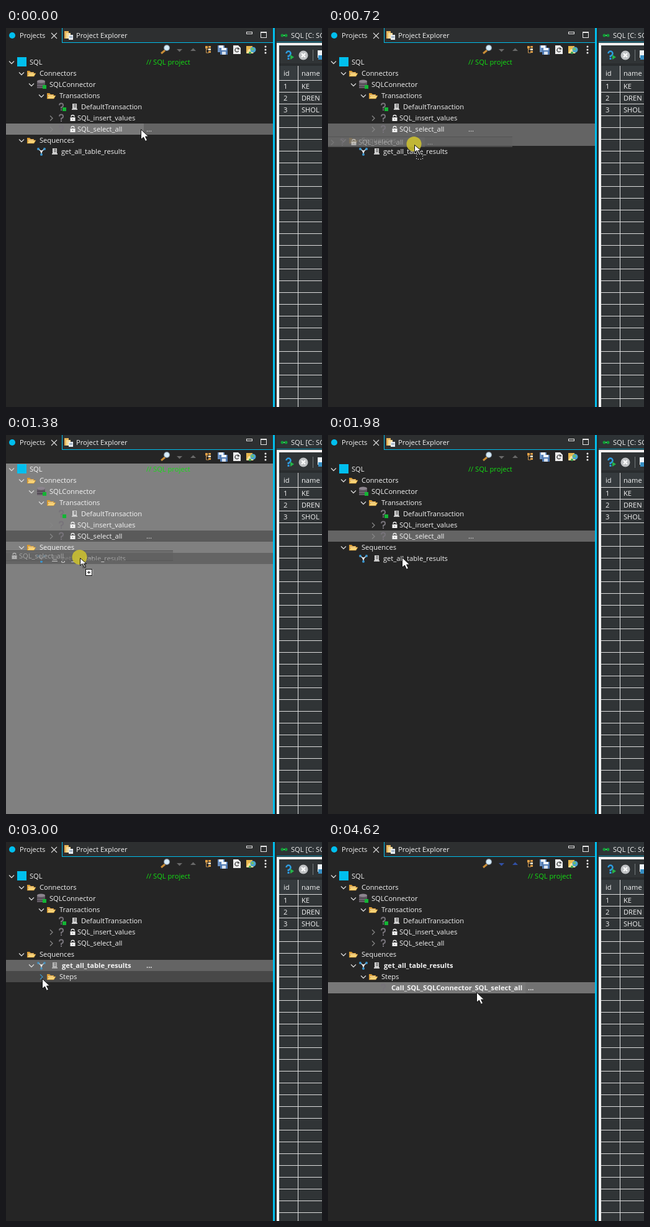
An HTML page with a canvas that plays this animation: 509x611 px, repeating every 6180 ms.

```html
<!DOCTYPE html>
<html lang="en">
<head>
<meta charset="utf-8">
<title>Project tree drag and drop</title>
<style>
html, body { margin: 0; width: 100%; height: 100%; overflow: hidden; background: #252525; }
canvas { display: block; }
</style>
</head>
<body>
<canvas id="stage" width="509" height="611"></canvas>
<script>
const ctx = document.getElementById('stage').getContext('2d');
const LOOP = 6180, STEP = 60;
const FONT = '11.15px "Open Sans", "Noto Sans", sans-serif';
const CYAN = '#00bfee', WHITE = '#f4f4f4', DARK = '#252525';
const SELECTED = '#646464', ACTIVE = '#787878', HOVER = '#484848';

// time, x, y of the pointer tip
const pointer = [
  [0, 217, 163], [60, 217, 163], [240, 206, 167], [360, 199, 169], [540, 167, 181],
  [720, 139, 188], [960, 129, 193], [1320, 119, 198], [2220, 119, 197],
  [2460, 98, 203], [2760, 42, 201], [2880, 38, 199], [2940, 46, 210],
  [3000, 58, 220], [3360, 60, 221], [3600, 110, 232], [3840, 170, 242],
  [4140, 239, 242], [LOOP, 239, 242]
];
// offset of the dragged row
const dragged = [[360, -5, 2], [540, -37, 12], [720, -66, 21], [1320, -94, 32], [1920, -94, 32]];

function along(path, t) {
  let i = 1;
  while (i < path.length - 1 && path[i][0] < t) i++;
  const a = path[i - 1], b = path[i];
  const k = Math.max(0, Math.min(1, (t - a[0]) / (b[0] - a[0])));
  return [Math.round(a[1] + (b[1] - a[1]) * k), Math.round(a[2] + (b[2] - a[2]) * k)];
}

function rect(x, y, w, h, color) {
  ctx.fillStyle = color;
  ctx.fillRect(x, y, w, h);
}

function poly(points, fill, stroke, width = 1, closed = true) {
  ctx.beginPath();
  points.forEach(([x, y]) => ctx.lineTo(x, y));
  if (closed) ctx.closePath();
  if (fill) { ctx.fillStyle = fill; ctx.fill(); }
  if (stroke) { ctx.strokeStyle = stroke; ctx.lineWidth = width; ctx.stroke(); }
}

function disc(x, y, r, fill) {
  ctx.beginPath();
  ctx.arc(x, y, r, 0, Math.PI * 2);
  ctx.fillStyle = fill;
  ctx.fill();
}

function ring(x, y, r, color, width, from = 0, to = Math.PI * 2) {
  ctx.beginPath();
  ctx.arc(x, y, r, from, to);
  ctx.strokeStyle = color;
  ctx.lineWidth = width;
  ctx.stroke();
}

function label(s, x, y, color = WHITE, bold = false) {
  ctx.font = (bold ? 'bold ' : '') + FONT;
  ctx.fillStyle = color;
  ctx.fillText(s, x, y);
}

function chevron(x, y, open, color) {
  const p = open ? [[-4, -2], [0, 2], [4, -2]] : [[-2, -4], [2, 0], [-2, 4]];
  poly(p.map(([a, b]) => [x + a, y + b]), null, color || (open ? '#d6d6d6' : '#858585'), 1.3, false);
}

const icons = {
  project(x, y) {
    rect(x - 7, y - 8, 15, 15, CYAN);
  },
  folder(x, y) {
    poly([[x - 6, y + 5], [x - 6, y - 4], [x - 2, y - 4], [x, y - 2], [x + 5, y - 2], [x + 5, y + 5]], '#d99c35');
    rect(x - 4, y - 1, 8, 3, '#fff6dc');
    poly([[x - 6, y + 5], [x - 3, y], [x + 8, y], [x + 5, y + 5]], '#fbd578', '#b98127', .6);
  },
  database(x, y) {
    rect(x - 7, y - 5, 13, 11, '#68606a');
    ctx.beginPath();
    ctx.ellipse(x - .5, y - 5, 6.5, 2.5, 0, 0, Math.PI * 2);
    ctx.fillStyle = '#8d858f';
    ctx.fill();
    rect(x - 7, y - 1, 13, 1, '#453f47');
    rect(x - 7, y + 3, 13, 1, '#453f47');
    rect(x + 2, y + 1, 6, 6, '#13b534');
  },
  query(x, y) {
    ring(x - 1, y - 2.5, 3, '#77737a', 2, Math.PI, Math.PI * 2.45);
    rect(x - 2, y, 2, 3, '#77737a');
    rect(x - 2, y + 4, 2, 2, '#77737a');
  },
  defaultQuery(x, y) {
    icons.query(x, y);
    rect(x + 1, y + 1, 6, 6, '#13b534');
  },
  doc(x, y) {
    rect(x - 3, y - 5, 7, 8, '#d8d8d8');
    for (let i = 0; i < 3; i++) rect(x - 1, y - 4 + i * 2, 4, 1, '#555');
    rect(x - 4, y + 3, 9, 2, '#c4c4c4');
  },
  lock(x, y) {
    ring(x + .5, y - 2, 2.5, '#eee', 1.3, Math.PI, 0);
    rect(x - 3.5, y - 1, 8, 6, '#f2f2f2');
    rect(x, y + 1, 1, 2, '#777');
  },
  sequence(x, y) {
    poly([[x - 5, y - 4], [x, y], [x + 5, y - 4]], null, '#dceaf4', 1.5, false);
    poly([[x, y], [x, y + 5]], null, '#dceaf4', 1.5, false);
    disc(x - 5, y - 4, 2, '#3c97cf');
    disc(x + 5, y - 4, 2, '#3c97cf');
    disc(x, y + 5, 2, '#3c97cf');
    disc(x, y, 1.7, '#fff');
  }
};

// row, chevron x, icons, text, text x
const nodes = [
  [0, 9, [['project', 25]], 'SQL', 38],
  [1, 25, [['folder', 40]], 'Connectors', 54],
  [2, 41, [['database', 57]], 'SQLConnector', 70],
  [3, 57, [['folder', 72]], 'Transactions', 86],
  [4, 0, [['defaultQuery', 90], ['doc', 110]], 'DefaultTransaction', 121],
  [5, 73, [['query', 90], ['lock', 107]], 'SQL_insert_values', 115],
  [6, 73, [['query', 90], ['lock', 107]], 'SQL_select_all', 115],
  [7, 25, [['folder', 40]], 'Sequences', 54],
  [8, 41, [['sequence', 57], ['doc', 78]], 'get_all_table_results', 89],
  [9, 57, [['folder', 72]], 'Steps', 86],
  [10, 0, [['query', 90]], 'Call_SQL_SQLConnector_SQL_select_all', 102]
];

function drawNode(node, t) {
  const [row, cx, marks, name, tx] = node;
  const y = 55 + row * 18;
  const bold = row === 10 || row === 8 && t >= 2040;
  let open = row !== 5 && row !== 6;
  if (row === 8) open = t >= 2940;
  if (row === 9) open = t >= 3300;
  if (cx && (row !== 8 || t >= 2040)) {
    chevron(cx, y + .5, open, row === 9 && !open ? '#3e91c0' : null);
  }
  ctx.globalAlpha = row === 8 && t >= 2040 && t < 4320 ? .75 : 1;
  marks.forEach(([kind, x]) => icons[kind](x, y));
  ctx.globalAlpha = 1;
  label(name, tx + (bold && row === 8 ? 1 : 0), y + 4, WHITE, bold);
}

function drawToolbar(t) {
  rect(0, 0, 433, 24, '#2d2f30');
  rect(0, 0, 90, 46, DARK);
  rect(0, 24, 430, 22, DARK);
  rect(90, 0, 1, 24, CYAN);
  rect(90, 23, 341, 1, CYAN);
  disc(10, 12, 5, CYAN);
  label('Projects', 22, 16);
  poly([[73, 8], [82, 17]], null, '#ddd', 1.1, false);
  poly([[82, 8], [73, 17]], null, '#ddd', 1.1, false);
  rect(94, 5, 7, 12, '#e8b65b');
  rect(97, 8, 7, 9, '#f3dca2');
  rect(101, 11, 7, 8, '#eef2f7');
  rect(102, 13, 5, 1, '#7990aa');
  rect(102, 15, 5, 1, '#7990aa');
  label('Project Explorer', 113, 16);
  ctx.strokeStyle = '#e7e7e7';
  ctx.lineWidth = 1;
  ctx.strokeRect(387.5, 6.5, 9, 3);
  ctx.strokeRect(410.5, 6.5, 9, 9);
  rect(410, 6, 10, 2, '#e7e7e7');

  poly([[250, 41], [256, 36]], null, '#c98d37', 3, false);
  disc(259, 32, 5, '#8b9cac');
  disc(259, 32, 3.8, '#d7edfa');
  const arrow = t >= 4320 ? '#3150a6' : '#686868';
  poly([[275, 34], [284, 34], [279.5, 38.5]], arrow);
  poly([[297, 37], [306, 37], [301.5, 32.5]], arrow);
  poly([[322.5, 29], [322.5, 40], [327, 40]], null, '#c89553', 1, false);
  rect(322, 34, 5, 1, '#c89553');
  rect(321, 29, 4, 4, '#dc9d45');
  for (let i = 0; i < 3; i++) rect(326, 29 + i * 4, 4, 3, i === 1 ? '#eee1c5' : '#d99c48');
  rect(341, 28, 11, 11, '#698fc1');
  rect(343, 28, 7, 4, '#edf4fb');
  rect(345, 32, 12, 11, '#4f79b2');
  rect(347, 32, 8, 4, '#eff5fb');
  rect(348, 38, 6, 5, '#d6e1ef');
  poly([[366, 28], [374, 28], [378, 32], [378, 42], [366, 42]], '#ededed');
  ring(372, 35.5, 3, '#555', 1.4, .5, 5.5);
  poly([[373, 31], [377, 34], [373, 35]], '#444');
  rect(387, 29, 10, 11, '#e7b84f');
  poly([[387, 41], [391, 34], [402, 34], [398, 41]], '#ffe39b');
  disc(398, 35, 4.5, '#4ba5ce');
  disc(397, 34, 2, '#70c35d');
  disc(393, 40, 2, '#39a650');
  [30, 35, 40].forEach(y => disc(418, y, 1.5, '#f4f4f4'));
}

function drawEditor() {
  rect(430, 0, 79, 611, '#292c2e');
  rect(430, 0, 3, 611, CYAN);
  rect(433, 0, 3, 611, '#292c2e');
  rect(436, 0, 73, 23, '#2e3336');
  rect(436, 22, 73, 1, '#0b8baa');
  rect(436, 24, 73, 587, '#f3f3f3');
  rect(440, 28, 69, 583, '#303436');
  disc(445, 12, 2.5, '#129a36');
  disc(451, 12, 2.5, '#129a36');
  rect(447, 11, 2, 2, '#52c573');
  label('SQL [C: SQL', 459, 16);

  ring(455, 41, 3.5, '#2d9ce0', 2.5, Math.PI, Math.PI * 2.45);
  rect(453.5, 44, 3, 3, '#2d9ce0');
  rect(453.5, 48, 3, 3, '#2d9ce0');
  poly([[458, 43], [464, 47], [458, 51]], '#25b34a');
  disc(479, 44, 7.5, '#bfc2c4');
  poly([[476, 41], [482, 47]], null, '#fff', 2, false);
  poly([[482, 41], [476, 47]], null, '#fff', 2, false);
  rect(494, 35, 1, 18, '#73787b');
  rect(502, 36, 7, 12, '#eef4f9');
  rect(503, 44, 6, 7, '#378fc4');

  rect(440, 57, 69, 4, '#292c2e');
  rect(440, 61, 69, 24, '#363b3e');
  label('id', 447, 77);
  label('name', 476, 77);
  rect(470, 61, 1, 550, '#dedede');
  for (let y = 84; y < 611; y += 19) rect(440, y, 69, 1, '#dedede');
  ['KE', 'DREN', 'SHOL'].forEach((name, i) => {
    label(String(i + 1), 447, 98 + i * 19);
    label(name, 476, 98 + i * 19);
  });
}

function band(row, left, right = left, split = 222) {
  rect(0, 46 + row * 18, 430, 18, right);
  rect(0, 46 + row * 18, split, 18, left);
}

function drawHighlights(t, tip) {
  if (t < 300) band(6, ACTIVE, SELECTED);
  else if (t < 2040) {
    band(6, t >= 840 && t < 1920 ? '#5a5a5a' : SELECTED);
    if (t >= 360 && t < 1920) {
      const row = Math.floor((tip[1] - 46) / 18);
      if (row > 6) band(row, SELECTED);
    }
  } else if (t < 4140) {
    if (t < 2940) band(8, ACTIVE, SELECTED);
    else band(8, SELECTED);
    if (t >= 3000 && t < 3540) band(9, HOVER);
    if (t >= 3540) band(10, HOVER);
  } else band(10, ACTIVE, '#727272', 318);
}

function drawTree(t, tip) {
  const wide = t >= 3300;
  const dropArea = t >= 840 && t < 1920;
  rect(0, 46, 430, 565, dropArea ? '#808080' : DARK);
  drawHighlights(t, tip);
  const last = t < 2940 ? 8 : t < 3300 ? 9 : 10;
  nodes.forEach(node => { if (node[0] <= last) drawNode(node, t); });
  const col = wide ? 322 : 226;
  label('// SQL project', col, 59, '#13df13');
  if (t < 2040) label('...', col, 167);
  else if (t < 4140) label('...', col, 203, WHITE, true);
  else if (t >= 4320) label('...', col, 239, WHITE, true);
}

function drawGhost(t) {
  if (t < 360 || t >= 1920) return;
  const [dx, dy] = along(dragged, t);
  ctx.save();
  ctx.beginPath();
  ctx.rect(0, 46, 430, 565);
  ctx.clip();
  ctx.translate(dx, dy);
  ctx.globalAlpha = .55;
  rect(0, 154, 363, 17, '#606060');
  rect(0, 154, 222, 17, '#696969');
  rect(0, 154, 363, 1, '#474747');
  rect(0, 170, 363, 1, '#505050');
  chevron(73, 163.5, false);
  icons.query(90, 163);
  icons.lock(107, 163);
  label('SQL_select_all', 115, 167, '#ddd');
  label('...', 226, 167, '#ddd');
  ctx.restore();
}

function drawPointer(t, [x, y]) {
  const drag = t >= 360 && t < 1920;
  const pressed = t >= 240 && t < 1920 || t >= 2820 && t < 2940 ||
    t >= 3240 && t < 3360 || t >= 4140 && t < 4380;
  if (pressed) disc(x - .5, y - 1, 12, 'rgba(207,196,46,.86)');
  ctx.save();
  ctx.translate(x + .5, y + .5);
  if (drag) {
    poly([[0, 0], [0, 12], [3, 9], [7, 15], [9, 14], [6, 9], [10, 9]], '#f8f8f8', '#111');
    for (let i = 0; i < 12; i++) rect(4 + i % 3 * 2, 9 + Math.floor(i / 3) * 2, 1, 1, '#111');
    if (t >= 1380) {
      rect(9, 18, 11, 10, '#fff');
      ctx.strokeStyle = '#111';
      ctx.lineWidth = 1;
      ctx.strokeRect(9, 18, 10, 10);
      rect(11.5, 22.5, 5, 1, '#111');
      rect(13.5, 20.5, 1, 5, '#111');
    } else {
      ctx.setLineDash([2, 2]);
      ctx.lineWidth = 1;
      ctx.strokeStyle = '#fff';
      ctx.strokeRect(3, 15, 10, 8);
      ctx.lineDashOffset = 2;
      ctx.strokeStyle = '#111';
      ctx.strokeRect(3, 15, 10, 8);
    }
  } else {
    poly([[0, 0], [0, 16], [4, 12.5], [7, 19], [10, 17.5], [7, 11.5], [12, 11.5]], '#fff', '#111');
  }
  ctx.restore();
}

function frame(now) {
  const t = Math.floor((now % LOOP) / STEP) * STEP;
  const tip = along(pointer, t);
  drawTree(t, tip);
  drawToolbar(t);
  drawEditor();
  drawGhost(t);
  drawPointer(t, tip);
  requestAnimationFrame(() => frame(performance.now() - start));
}

const start = performance.now();
frame(0);
</script>
</body>
</html>
```
